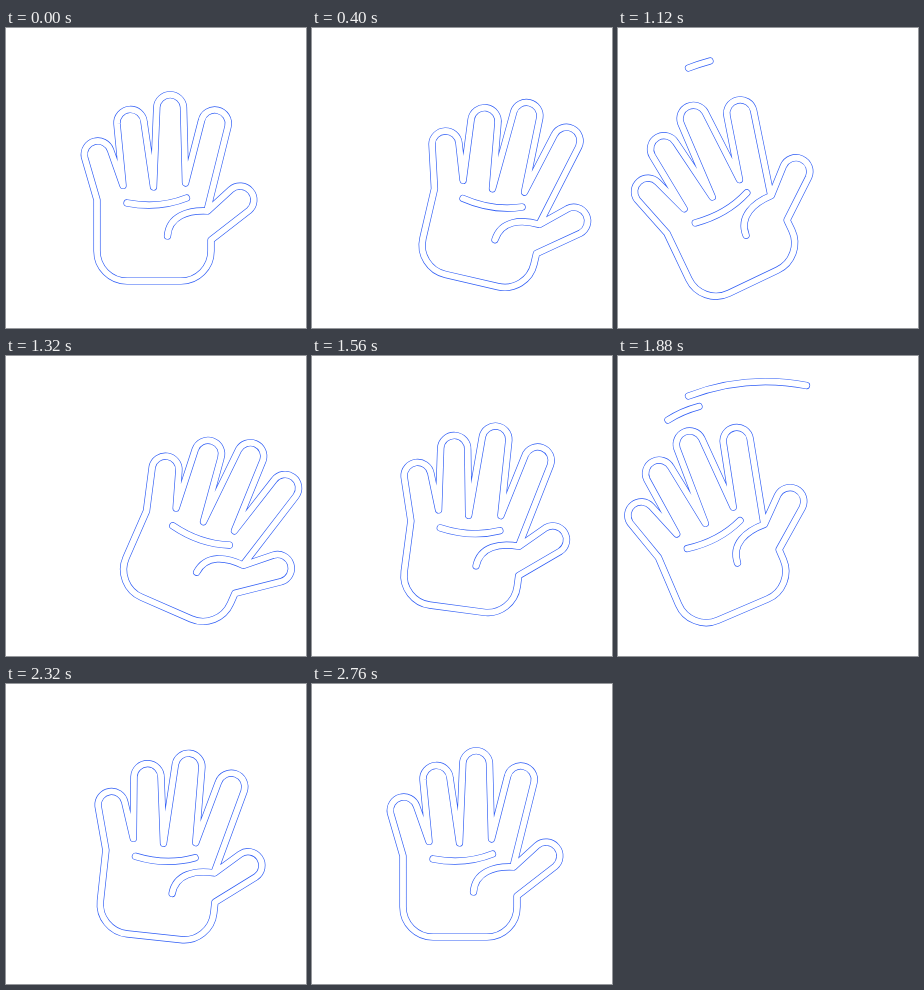
Animation of 300x300 px, one loop 3000 ms. Source, as an HTML page:

```html
<!DOCTYPE html>
<html lang="en">
<head>
<meta charset="utf-8">
<title>Waving hand</title>
<style>
  html, body { margin: 0; width: 100%; height: 100%; overflow: hidden; background: #fff; }
  svg { display: block; width: 100%; height: 100%; }
  path { fill: none; stroke-linecap: round; stroke-linejoin: round; }
  .edge { stroke: #2f5df5; stroke-width: 7.2; }
  .core { stroke: #fff; stroke-width: 5.9; }
</style>
</head>
<body>
<svg viewBox="0 0 300 300">
  <defs>
    <path id="outline" d="M201.5 181 L222 98.5 A13.5 13.5 0 0 0 195.5 92.5 L179.5 155
      L177.5 79 A13.4 13.4 0 0 0 150.8 79 L147.5 159
      L138 94 A13.5 13.5 0 0 0 111 96 L117 157.5
      L104.5 122 A13.5 13.5 0 0 0 78.5 129 L91 172
      V223 A30 30 0 0 0 121 253 H175 A30 30 0 0 0 205 223 V212
      L243 182.5 A13.5 13.5 0 0 0 225 161.5 L201.5 183 C182 182 163 188 161.5 208
      M121 175 Q153 181 180.5 170"/>
  </defs>
  <g id="hand">
    <use href="#outline" class="edge"/>
    <use href="#outline" class="core"/>
  </g>
  <g id="trails"></g>
</svg>
<script>
const LOOP = 3000, STEP = 40, START = 220, END = 2760;
const PIVOT = [150, 251.5];

const ease = f => (1 - Math.cos(Math.PI * Math.min(1, Math.max(0, f)))) / 2;

// Repeats a swing to the right and back to the left, resting there for `hold` ms.
// Each peak pair gives the right and left extreme of one swing.
function makeSwing(first, period, toLeft, hold, peaks) {
  const keys = [[START, 0]];
  peaks.forEach(([right, left], i) => {
    const time = first + i * period;
    keys.push([time, right], [time + toLeft, left], [time + toLeft + hold, left]);
  });
  keys.push([END, 0]);
  return t => {
    const next = keys.findIndex(([time]) => time > t);
    if (next < 1) return 0;
    const [t0, a] = keys[next - 1], [t1, b] = keys[next];
    return a + (b - a) * ease((t - t0) / (t1 - t0));
  };
}

const angleAt = makeSwing(612, 765, 438, 0, [[30, -32], [28, -27], [14, -8]]);
const shiftAt = makeSwing(540, 860, 320, 240, [[20, -14], [18, -24], [0, 0]]);

const hand = document.getElementById('hand');
const trails = document.getElementById('trails');

function makeTrail(d, eraseSpeed) {
  const strokes = ['edge', 'core'].map(name => {
    const path = document.createElementNS('http://www.w3.org/2000/svg', 'path');
    path.setAttribute('d', d);
    path.setAttribute('class', name);
    trails.append(path);
    return path;
  });
  const length = strokes[0].getTotalLength();
  // Drawn from its first end in 120 ms, then erased in the same direction.
  return age => {
    const head = ease(age / 120);
    const tail = Math.min(1, eraseSpeed * ease((age - 120) / 168));
    strokes.forEach(path => {
      path.style.display = head - tail > 0.01 ? '' : 'none';
      path.style.strokeDasharray = `${(head - tail) * length} ${length * 3}`;
      path.style.strokeDashoffset = -tail * length;
    });
  };
}

const longTrail = makeTrail('M188.5 29.5 Q128 18 70.5 40', 1);
const shortTrail = makeTrail('M81 50.5 Q64 55 50 64', 1.3);

function draw(now) {
  const t = Math.floor(now % LOOP / STEP) * STEP;
  hand.setAttribute('transform',
    `translate(${shiftAt(t)} 0) rotate(${angleAt(t)} ${PIVOT})`);
  const age = (t - 880 + LOOP) % LOOP % 880;
  const trailAge = t >= 880 && t < 2640 ? age : 0;
  longTrail(trailAge);
  shortTrail(trailAge);
}

const start = performance.now();
function tick(now) {
  draw(Math.max(0, now - start));
  requestAnimationFrame(tick);
}
requestAnimationFrame(tick);
</script>
</body>
</html>
```
